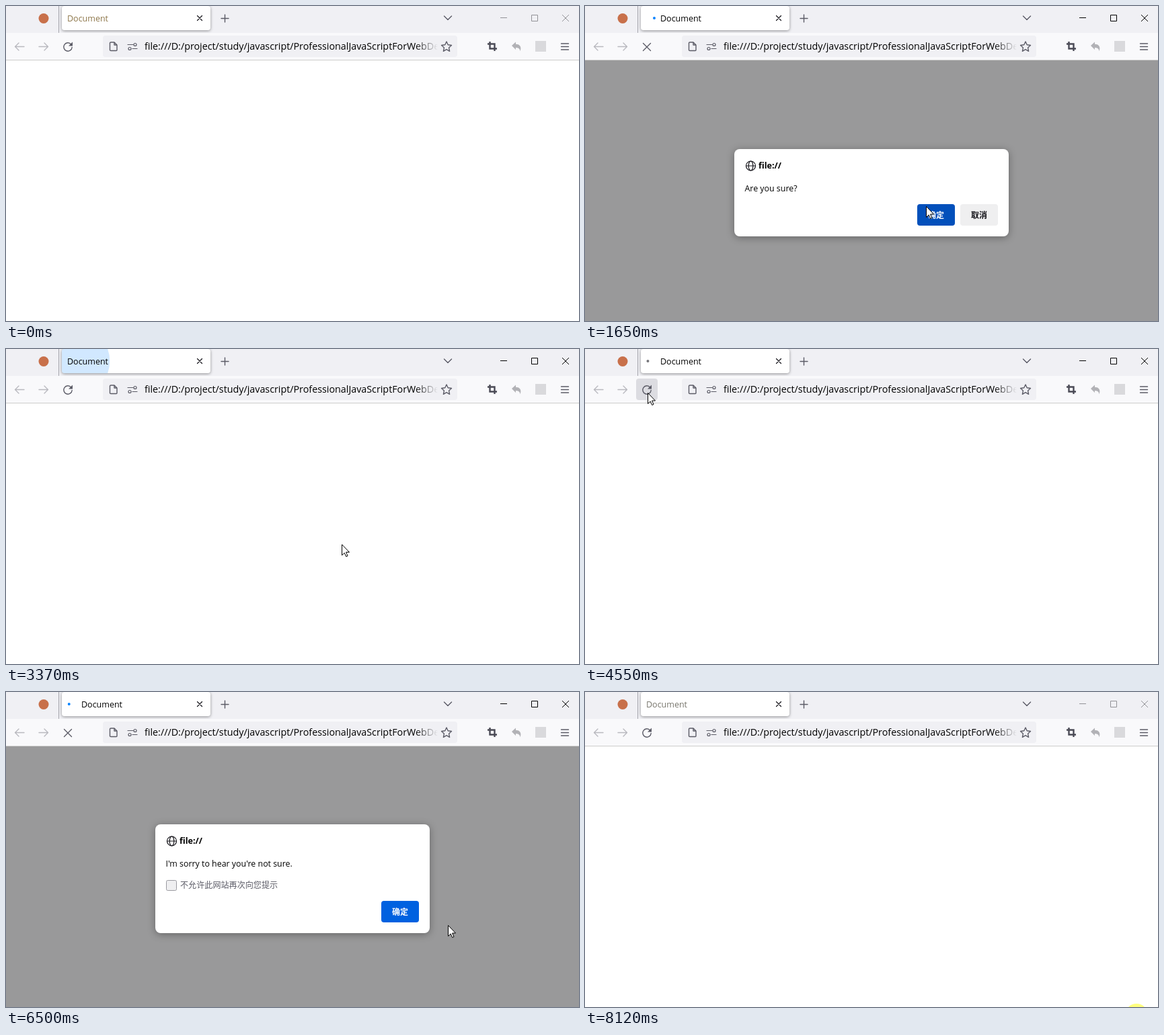
Write an HTML page that moves like this. It is 852 px wide and 469 px high and loops after 8160 ms.

```html
<!DOCTYPE html>
<html lang="en">
<head>
<meta charset="utf-8">
<title>Confirm dialog demo</title>
<style>
  html, body { margin: 0; width: 100%; height: 100%; overflow: hidden; background: #fff; }
  svg { display: block; width: 852px; height: 469px; font: 12.4px "Open Sans", "Noto Sans CJK SC", "Noto Sans CJK", sans-serif; fill: #000; }
  .line { fill: none; stroke: #5b5b66; stroke-width: 1.4; stroke-linecap: round; stroke-linejoin: round; }
  .pale { stroke: #b9b9bf; }
  .thin { stroke-width: 1; stroke-linecap: butt; }
  .bold { font-weight: 700; }
  .button { font-size: 12px; font-weight: 700; text-anchor: middle; }
  .card, .tab { filter: drop-shadow(0 1px 2px #0006); }
  .card { filter: drop-shadow(0 2px 6px #0005); }
</style>
</head>
<body>
<svg viewBox="0 0 852 469">
  <defs>
    <clipPath id="tabClip"><rect x="83" y="0" width="221" height="36" rx="4"/></clipPath>
    <linearGradient id="fade">
      <stop stop-color="#f0f0f4" stop-opacity="0"/><stop offset="1" stop-color="#f0f0f4"/>
    </linearGradient>
  </defs>

  <!-- tab strip -->
  <rect width="852" height="469" fill="#fff"/>
  <rect width="852" height="40" fill="#f0f0f4"/>
  <circle cx="56" cy="18.5" r="7.5" fill="#c8704a"/>
  <rect x="78" width="1" height="40" fill="#a5a5ad"/>
  <rect class="tab" x="83" y="0" width="221" height="36" rx="4" fill="#fff"/>
  <circle id="burst" cx="99" cy="18" fill="#0a84ff" clip-path="url(#tabClip)"/>
  <circle id="throbber" cy="18" r="2"/>
  <text id="tabTitle" y="23" font-size="12.5">Document</text>
  <path class="line" style="stroke:#15141a;stroke-width:1.2" d="M284.5 14.5l7 7m0-7l-7 7"/>
  <path class="line" d="M320 18.5h11m-5.5-5.5v11M651.5 15l5.5 5.5 5.5-5.5"/>
  <path id="windowButtons" class="line thin" d="M735 17.5h10M781.5 13.5h9v9h-9zM827 13l10 10m0-10l-10 10"/>

  <!-- toolbar -->
  <rect y="40" width="852" height="40" fill="#f9f9fb"/>
  <rect y="80" width="852" height="1" fill="#ccc"/>
  <path class="line pale" d="M27 60.5H13.5m5.5-5.5l-5.5 5.5 5.5 5.5M49 60.5h13.5m-5.5-5.5l5.5 5.5-5.5 5.5"/>
  <rect id="reloadHover" x="76" y="44" width="32" height="32" rx="4" fill="#dcdce1"/>
  <g id="reload">
    <path class="line" d="M96.8 57A6.2 6.2 0 1 0 98.2 61.5"/>
    <path d="M99 53.5v6h-6z" fill="#5b5b66"/>
  </g>
  <path id="stop" class="line" d="M86.5 55.5l11 11m0-11l-11 11"/>
  <rect x="144" y="44" width="527" height="32" rx="4" fill="#f0f0f4"/>
  <path class="line" d="M156 54h5l4 4v7.500q0 1-1 1h-8q-1.500 0-1.500-1V55q0-1 1.500-1zM161 54v4h4"/>
  <path class="line" style="stroke-width:1.2" d="M181 57.500h8M188 63.500h7"/>
  <g class="line" style="stroke-width:1.2"><circle cx="192" cy="57.500" r="2"/><circle cx="184" cy="63.500" r="2"/></g>
  <text x="206" y="65" font-size="14.300">file:///D:/project/study/javascript/ProfessionalJavaScriptForWebDe</text>
  <rect x="608" y="46" width="34" height="28" fill="url(#fade)"/>
  <rect x="642" y="46" width="27" height="28" fill="#f0f0f4"/>
  <path class="line" d="M655 53l2.200 4.800 5.300.7-3.900 3.600 1 5.200-4.600-2.600-4.600 2.600 1-5.200-3.900-3.600 5.300-.7z"/>
  <path class="line" style="stroke:#4a4a55;stroke-width:2.400;stroke-linecap:butt;stroke-linejoin:miter" d="M719.500 53v10.500H730M716 56.500h10.500V67"/>
  <path d="M752 59l6-5.500v3.300c6 0 9 4 6.500 10.500-.5-4-2.500-5.300-6.500-5.300v3z" fill="#b2b2b6"/>
  <rect x="787" y="52" width="16" height="16" fill="#d9d9dc"/>
  <path class="line" d="M825.500 56h11m-11 4.500h11m-11 4.500h11"/>

  <!-- modal -->
  <g id="modal">
    <rect y="81" width="852" height="388" fill="#99999a"/>
    <g id="dialog">
      <rect id="card" class="card" width="408" rx="8" fill="#fff"/>
      <g class="line" style="stroke:#15141a;stroke-width:1.200">
        <circle cx="24.500" cy="25" r="7"/><ellipse cx="24.500" cy="25" rx="3.300" ry="7"/><path d="M17.500 25h14"/>
      </g>
      <text class="bold" x="36" y="29" font-size="12.600">file://</text>
      <text id="message" x="15.500" y="63"/>
      <g id="checkbox">
        <rect x="16.500" y="83.500" width="15" height="15" rx="2" fill="#efeff1" stroke="#9a9aa0"/>
        <text x="37" y="95" font-size="12.100" fill="#5b5b66">不允许此网站再次向您提示</text>
      </g>
      <g id="ok" class="button">
        <rect id="okFill" width="56" height="32" rx="4"/><text x="28" y="21" fill="#fff">确定</text>
      </g>
      <g id="cancel" class="button">
        <rect id="cancelFill" width="56" height="32" rx="4"/><text x="28" y="21" fill="#15141a">取消</text>
      </g>
    </g>
  </g>

  <circle id="click" r="17" fill="#ff0" fill-opacity=".5"/>
  <path id="cursor" d="M.5.5V16.500L4.200 13 6.700 18.500 9 17.500 6.600 12H11.500z" fill="#fff" stroke="#000"/>
</svg>
<script>
const LOOP = 8160, ACTIVE = [970, 8080];
const loads = [[985, 3250], [4485, 7350]];
const dialogs = [
  { from: 1200, to: 1890, text: "Are you sure?", confirm: true },
  { from: 2150, to: 2950, text: "I'm glad you're sure!" },
  { from: 4760, to: 5420, text: "Are you sure?", confirm: true },
  { from: 5800, to: 7080, text: "I'm sorry to hear you're not sure." }
];
const clicks = [870, 1800, 2860, 4460, 5330, 6990, 8080];
// time, x, y
const path = [
  [130, 693, 435], [820, 86, 66], [1060, 86, 66], [1600, 507, 298], [2100, 507, 298],
  [2560, 530, 306], [2660, 572, 320], [2860, 582, 323], [3080, 582, 323], [3510, 472, 280],
  [4100, 93, 65], [4620, 93, 65], [5240, 580, 320], [5860, 580, 320], [6380, 657, 347],
  [6520, 657, 347], [6890, 585, 328], [7150, 585, 328], [7770, 817, 456], [7880, 817, 470],
  [8000, 820, 481]
];
const el = Object.fromEntries([...document.querySelectorAll("[id]")].map(e => [e.id, e]));
const set = (e, attrs) => { for (const k in attrs) e.setAttribute(k, attrs[k]); };
const show = (e, on) => { e.style.display = on ? "" : "none"; };
const move = (e, x, y) => set(e, { transform: `translate(${x} ${y})` });
const within = (t, [a, b]) => t >= a && t < b;

function pointer(t) {
  const i = path.findIndex(p => p[0] > t);
  if (i < 1) return (i ? path[path.length - 1] : path[0]).slice(1);
  const [t0, x0, y0] = path[i - 1], [t1, x1, y1] = path[i];
  const u = (t - t0) / (t1 - t0), k = u * u * (3 - 2 * u);
  return [x0 + (x1 - x0) * k, y0 + (y1 - y0) * k];
}

function drawTab(t) {
  const active = within(t, ACTIVE), load = loads.find(l => within(t, l));
  const age = load ? t - load[0] : 0;
  set(el.tabTitle, { x: load ? 112 : 91, fill: active ? "#000" : t < 970 ? "#8d7649" : "#77756c" });
  el.windowButtons.style.stroke = active ? "#000" : "#929297";
  show(el.throbber, load);
  set(el.throbber, { cx: 99 - 6 * Math.cos(age / 1050 * 2 * Math.PI), fill: age < 200 ? "#75757a" : "#0a84ff" });
  show(el.reload, age < 150);
  show(el.stop, age >= 150);
  const done = loads.find(l => within(t, [l[1], l[1] + 375]));
  show(el.burst, done);
  if (done) {
    const u = (t - done[1]) / 375, k = u * (2 - u);
    set(el.burst, { r: 2.5 + 97.5 * k, opacity: 0.4 * (1 - k) });
  }
}

function drawDialog(t, isOver) {
  const d = dialogs.find(d => within(t, [d.from, d.to]));
  show(el.modal, d);
  if (!d) return;
  const top = d.confirm ? 213 : 197, height = d.confirm ? 130 : 162;
  const y = height - 48, okX = d.confirm ? 272 : 336;
  move(el.dialog, 222, top);
  set(el.card, { height });
  el.message.textContent = d.text;
  show(el.checkbox, !d.confirm);
  show(el.cancel, d.confirm);
  move(el.ok, okX, y);
  move(el.cancel, 336, y);
  const hover = x => isOver(222 + x, top + y, 56, 32);
  set(el.okFill, { fill: hover(okX) ? "#0250bb" : "#0061e0" });
  set(el.cancelFill, { fill: hover(336) ? "#dcdce1" : "#efeff0" });
}

function draw(t) {
  const [x, y] = pointer(t);
  const [hx, hy] = pointer(t - 60); // hover lags the pointer slightly
  const isOver = (l, u, w, h) => hx >= l && hx < l + w && hy >= u && hy < u + h;
  drawTab(t);
  show(el.reloadHover, isOver(76, 44, 32, 32));
  drawDialog(t, isOver);
  show(el.cursor, within(t, [130, 7880]));
  move(el.cursor, x, y);
  show(el.click, clicks.some(c => within(t, [c, c + 80])));
  move(el.click, x, y);
}

const start = performance.now();
function tick() {
  draw((performance.now() - start) % LOOP);
  requestAnimationFrame(tick);
}
tick();
</script>
</body>
</html>
```
